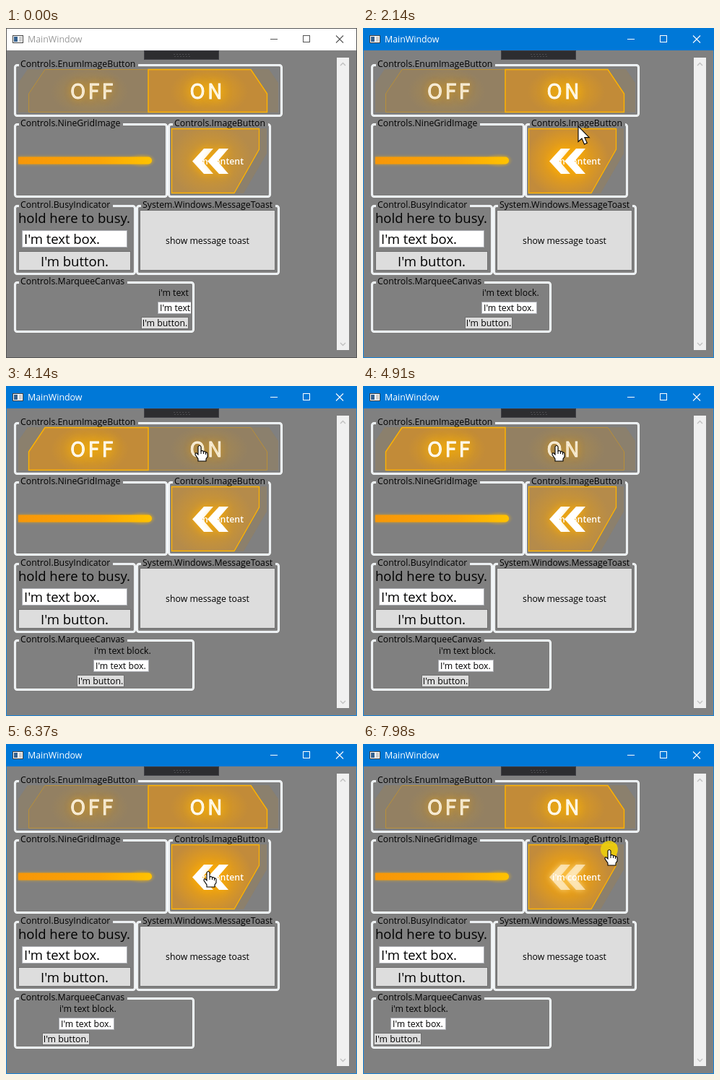
Write an HTML page with a canvas that moves like this. It is 486 px wide and 457 px high and loops after 8000 ms.

```html
<!DOCTYPE html>
<html lang="en">
<head>
<meta charset="utf-8">
<title>MainWindow</title>
<style>
  html, body { margin: 0; width: 100%; height: 100%; overflow: hidden; background: #808080; }
  canvas { display: block; width: 486px; height: 457px; }
</style>
</head>
<body>
<canvas id="stage"></canvas>
<script>
const LOOP = 8000, STEP = 76.8, LEAD = 12;
const canvas = document.getElementById('stage');
const ctx = canvas.getContext('2d');
const dpr = window.devicePixelRatio || 1;
canvas.width = 486 * dpr;
canvas.height = 457 * dpr;

const UI = '"Open Sans", "Noto Sans", sans-serif';
const CAPS = '"Noto Sans CJK SC", "Noto Sans CJK JP", "Open Sans", sans-serif';

// Pointer stops: time, x, y
const STOPS = [
  [400, 300, 428], [830, 257, 277], [1400, 257, 277], [2130, 298, 136],
  [2480, 268, 82], [5230, 268, 82], [5600, 162, 190], [6000, 162, 190],
  [6500, 307, 173], [7150, 307, 173], [7600, 331, 169], [7900, 341, 146]
];
const PRESSES = [[1090, 1240], [2880, 3040], [4980, 5130], [6820, LOOP]];
const OFF_TIME = [3040, 5130];
const ACTIVE_FROM = 1090;

const between = (t, [start, end]) => t >= start && t < end;
const inside = (p, x1, y1, x2, y2) => p.x >= x1 && p.x < x2 && p.y >= y1 && p.y < y2;

function pointerAt(t) {
  if (t < STOPS[0][0]) return { x: -99, y: -99 };
  const next = STOPS.findIndex(stop => stop[0] > t);
  if (next < 0) { const [, x, y] = STOPS[STOPS.length - 1]; return { x, y }; }
  const [t0, x0, y0] = STOPS[next - 1], [t1, x1, y1] = STOPS[next];
  const u = (t - t0) / (t1 - t0), s = u * u * (3 - 2 * u);
  return { x: Math.round(x0 + (x1 - x0) * s), y: Math.round(y0 + (y1 - y0) * s) };
}

function rect(x, y, w, h, fill, border) {
  ctx.fillStyle = border || fill;
  ctx.fillRect(x, y, w, h);
  if (border) {
    ctx.fillStyle = fill;
    ctx.fillRect(x + 1, y + 1, w - 2, h - 2);
  }
}

function text(string, x, y, { size = 12.3, color = '#000', weight = 400, family = UI, align = 'left', outline = 0 } = {}) {
  ctx.font = `${weight} ${size}px ${family}`;
  ctx.fillStyle = color;
  ctx.textAlign = align;
  ctx.fillText(string, x, y);
  if (outline) {
    ctx.strokeStyle = color;
    ctx.lineWidth = outline;
    ctx.strokeText(string, x, y);
  }
}

function poly(points, fill, stroke, width = 1) {
  ctx.beginPath();
  points.forEach(([x, y]) => ctx.lineTo(x, y));
  ctx.closePath();
  if (fill) { ctx.fillStyle = fill; ctx.fill(); }
  if (stroke) { ctx.strokeStyle = stroke; ctx.lineWidth = width; ctx.stroke(); }
}

function line(points, color, width = 1) {
  ctx.beginPath();
  points.forEach(([x, y]) => ctx.lineTo(x, y));
  ctx.strokeStyle = color;
  ctx.lineWidth = width;
  ctx.stroke();
}

// Soft elliptical light
function glow(x, y, rx, ry, rgb, alpha) {
  ctx.save();
  ctx.translate(x, y);
  ctx.scale(1, ry / rx);
  const light = ctx.createRadialGradient(0, 0, 0, 0, 0, rx);
  light.addColorStop(0, `rgba(${rgb},${alpha})`);
  light.addColorStop(0.45, `rgba(${rgb},${alpha * 0.6})`);
  light.addColorStop(1, `rgba(${rgb},0)`);
  ctx.fillStyle = light;
  ctx.fillRect(-rx, -rx, 2 * rx, 2 * rx);
  ctx.restore();
}

function shadow(color, blur) {
  ctx.shadowColor = color;
  ctx.shadowBlur = blur * dpr;
}

function groupBox(x, y, right, bottom, header) {
  [['#fff', 3], ['#d5dfe5', 1]].forEach(([color, width]) => {
    ctx.beginPath();
    ctx.roundRect(x + 1.5, y + 1.5, right - x - 3, bottom - y - 3, 3);
    ctx.strokeStyle = color;
    ctx.lineWidth = width;
    ctx.stroke();
  });
  ctx.font = `12.3px ${UI}`;
  rect(x + 7, y - 1, Math.ceil(ctx.measureText(header).width) + 5, 5, '#808080');
  text(header, x + 9, y + 4);
}

function drawWindow(active) {
  const ink = active ? '#fff' : '#555';
  rect(0, 0, 486, 457, '#808080', active ? '#1883d7' : '#555');
  rect(active ? 0 : 1, active ? 0 : 1, active ? 486 : 484, active ? 31 : 30, active ? '#0078d7' : '#fff');
  rect(9, 10, 15, 11, '#fff', '#444');
  rect(11, 12, 5, 7, '#35618e');
  rect(18, 12, 4, 7, '#ccc');
  text('MainWindow', 30, 20, { size: 12.4, color: active ? '#fff' : '#999' });
  line([[366, 15.5], [376, 15.5]], ink);
  ctx.strokeRect(411.5, 10.5, 9, 9);
  line([[457, 10.5], [467, 20.5]], ink, 1.1);
  line([[467, 10.5], [457, 20.5]], ink, 1.1);

  rect(191, 31, 104, 13, '#2d2d30', '#3f3f46');
  for (let x = 232; x < 254; x += 4) {
    rect(x, 36, 2, 1, '#4c4c50');
    rect(x + 1, 39, 2, 1, '#4c4c50');
  }
  rect(458, 41, 17, 405, '#f0f0f0');
  line([[463, 52], [466.5, 48.5], [470, 52]], '#bfbfbf', 1.3);
  line([[463, 436], [466.5, 439.5], [470, 436]], '#bfbfbf', 1.3);
}

function switchHalf(points, label, x, lit) {
  ctx.save();
  poly(points, lit ? '#c28b38' : '#938062');
  ctx.clip();
  glow(x + 27, 88, 54, 34, '255,175,0', lit ? 0.5 : 0.2);
  ctx.restore();
  poly(points, null, lit ? '#ffb300' : '#b98f38', lit ? 1.4 : 1);
  ctx.save();
  ctx.letterSpacing = '3.3px';
  shadow(lit ? '#ffb800' : '#c8922a', lit ? 14 : 10);
  text(label, x, 98, {
    size: 28.5, weight: 500, family: CAPS, outline: 0.9, color: lit ? '#fff' : '#fdf6e6'
  });
  ctx.restore();
}

function drawSwitch(isOff) {
  poly([[17, 117], [17, 76], [30, 57], [54, 57], [31, 91], [31, 117]], 'rgba(165,125,60,.28)');
  poly([[377, 117], [377, 76], [364, 57], [339, 57], [362, 91], [362, 117]], 'rgba(165,125,60,.28)');
  const left = () => switchHalf([[31.5, 116.5], [31.5, 91], [54, 57.5], [197, 57.5], [197, 116.5]], 'OFF', 89, isOff);
  const right = () => switchHalf([[197, 57.5], [339, 57.5], [361.5, 91], [361.5, 116.5], [197, 116.5]], 'ON', 254.5, !isOff);
  // The lit half lies on top so that its edge shows at the seam
  (isOff ? [right, left] : [left, right]).forEach(drawHalf => drawHalf());
}

function drawBar() {
  const gold = ctx.createLinearGradient(17, 0, 204, 0);
  gold.addColorStop(0, '#f79708');
  gold.addColorStop(0.6, '#fba506');
  gold.addColorStop(1, '#ffc400');
  glow(188, 183.5, 20, 10, '255,190,0', 0.5);
  ctx.save();
  shadow('rgba(255,180,0,.6)', 4);
  ctx.beginPath();
  ctx.roundRect(17, 178.5, 185, 10, [0, 5, 5, 0]);
  ctx.fillStyle = gold;
  ctx.fill();
  ctx.restore();
}

function drawImageButton(hover, pressed) {
  const face = [[229.5, 139.5], [350.5, 139.5], [350.5, 168], [316, 228.5], [229.5, 228.5]];
  const bright = hover || pressed;
  poly([[351, 139], [361, 139], [361, 174], [329, 229], [316, 229], [351, 168]], 'rgba(165,125,60,.3)');
  ctx.save();
  poly(face, bright ? '#c28b3b' : '#b58b4a');
  ctx.clip();
  glow(283, 184, 58, 52, '255,170,0', bright ? 0.95 : 0.48);
  ctx.restore();
  poly(face, null, '#ffb300', 1.3);

  ctx.save();
  ctx.globalAlpha = pressed ? 0.72 : 1;
  shadow(pressed ? '#ffe9b0' : '#ffb000', pressed ? 8 : 12);
  [258, 279].forEach(x => poly([
    [x, 184.5], [x + 16, 167], [x + 29, 167], [x + 14, 184.5], [x + 29, 202], [x + 16, 202]
  ], pressed ? '#fff0d0' : '#fff'));
  ctx.restore();
  text("i'm content", 262, 189, { weight: 600, color: '#fff' });
}

function drawBusyPanel() {
  const size = 18.5;
  text('hold here to busy.', 17, 270, { size });
  rect(22, 280, 146, 24, '#fff', '#abadb3');
  text("I'm text box.", 25, 299, { size });
  rect(17, 309, 156, 27, '#ddd', '#707070');
  text("I'm button.", 95, 330, { size, align: 'center' });
}

function drawToastButton(hover, pressed) {
  const [fill, border] = pressed ? ['#c4e5f6', '#2c628b'] : hover ? ['#bee6fd', '#3c7fb1'] : ['#ddd', '#707070'];
  rect(185, 252, 188, 84, fill, border);
  text('show message toast', 279, 299, { align: 'center' });
}

function drawMarquee(t) {
  const x = Math.round(187 - 0.02155 * t);
  ctx.save();
  ctx.beginPath();
  ctx.rect(16, 357, 240, 61);
  ctx.clip();
  text("i'm text block.", x + 24, 371);
  rect(x + 23, 379, 77, 17, '#fff', '#abadb3');
  text("I'm text box.", x + 26, 392);
  rect(x, 400, 66, 17, '#ddd', '#707070');
  text("I'm button.", x + 33, 413, { align: 'center' });
  ctx.restore();
}

const arrow = new Path2D('M0 0V21.5L5 17L8.5 25L12.3 23.3L8.8 15.6H15.3Z');
const hand = new Path2D('M-2 2Q0-1 2 2V8Q5 7 5.5 9Q8 8 8.5 10Q11 9.500 11 12V16L9 19V22H-2V19L-6 13Q-6 10-4 11L-2 13Z');

function drawPointer({ x, y }, isHand, pressed) {
  ctx.save();
  ctx.translate(x, y);
  if (pressed) {
    ctx.beginPath();
    ctx.arc(0, 0, 12, 0, 2 * Math.PI);
    ctx.fillStyle = 'rgba(238,210,10,.85)';
    ctx.fill();
  }
  const shape = isHand ? hand : arrow;
  ctx.fillStyle = '#fff';
  ctx.fill(shape);
  ctx.strokeStyle = '#000';
  ctx.lineWidth = 1.1;
  ctx.stroke(shape);
  if (isHand) {
    line([[2, 8], [2, 12]], '#000');
    line([[5.5, 9], [5.5, 12]], '#000');
    line([[8.5, 10], [8.5, 13]], '#000');
  }
  ctx.restore();
}

function draw(now) {
  // The picture advances in even steps
  const t = Math.max(0, Math.floor((now % LOOP + LEAD) / STEP) * STEP - LEAD);
  const pointer = pointerAt(t);
  const pressed = PRESSES.some(span => between(t, span));
  const overToast = inside(pointer, 185, 252, 373, 336);
  const overImage = inside(pointer, 229, 135, 351, 229);
  const isHand = inside(pointer, 229, 139, 351, 229) || inside(pointer, 17, 57, 377, 117);

  ctx.setTransform(dpr, 0, 0, dpr, 0, 0);
  drawWindow(t >= ACTIVE_FROM);
  groupBox(11, 50, 383, 123, 'Controls.EnumImageButton');
  groupBox(11, 132, 224, 235, 'Controls.NineGridImage');
  groupBox(224, 132, 367, 235, 'Controls.ImageButton');
  groupBox(11, 245, 180, 342, 'Control.BusyIndicator');
  groupBox(180, 245, 379, 342, 'System.Windows.MessageToast');
  groupBox(11, 351, 261, 422, 'Controls.MarqueeCanvas');
  drawSwitch(between(t, OFF_TIME));
  drawBar();
  drawImageButton(overImage, overImage && pressed);
  drawBusyPanel();
  drawToastButton(overToast, overToast && pressed);
  drawMarquee(t);
  drawPointer(pointer, isHand, pressed);
}

const start = performance.now();
function tick() {
  draw(performance.now() - start);
  requestAnimationFrame(tick);
}
tick();
</script>
</body>
</html>
```
